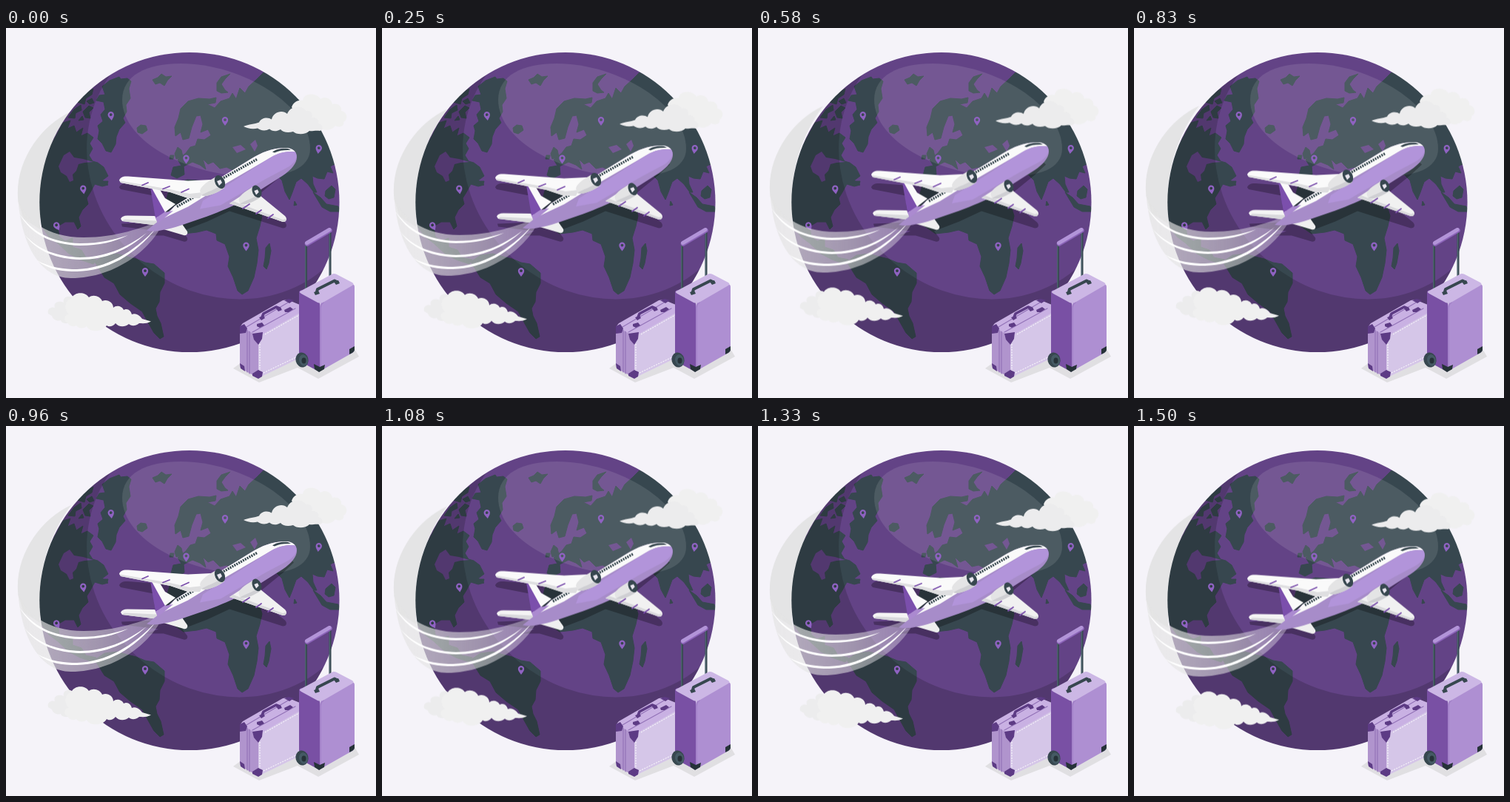
Animation, 500 px wide and 500 px high, one loop 1540 ms. Source, as an HTML page:

```html
<!DOCTYPE html>
<html lang="en">
<head>
<meta charset="utf-8">
<title>Travel</title>
<style>
html, body { margin: 0; width: 100%; height: 100%; overflow: hidden; background: #f5f3f9; }
svg { display: block; width: 100vw; height: 100vh; }
.float { animation: float 770ms -58ms linear infinite alternate; }
@keyframes float {
  from { transform: translateY(.75px); }
  to { transform: translateY(-9.25px); }
}
.land { fill: #37474f; stroke: #37474f; stroke-width: 1; stroke-linejoin: round; }
.sea { fill: #634386; }
.pin { fill: #8f62c2; fill-rule: evenodd; }
.line { fill: none; stroke-linecap: round; stroke-linejoin: round; }
</style>
</head>
<body>
<svg viewBox="0 0 500 500">
<defs>
  <clipPath id="globe"><circle cx="247.900" cy="235.500" r="202.600"/></clipPath>
  <linearGradient id="fade" gradientUnits="userSpaceOnUse" x1="20" y1="0" x2="215" y2="0">
    <stop offset="0" stop-color="#e4e4e4" stop-opacity=".7"/>
    <stop offset=".55" stop-color="#e4e4e4" stop-opacity=".54"/>
    <stop offset="1" stop-color="#e0d8ea" stop-opacity=".38"/>
  </linearGradient>
  <path id="pin" d="M0 6C-2 3-4.2 1-4.2-1.8A4.2 4.2 0 0 1 4.2-1.8C4.2 1 2 3 0 6ZM0-3.8A1.9 1.9 0 1 0 0 0A1.9 1.9 0 1 0 0-3.8Z"/>
  <path id="body" d="M190 272L204 261 228 239 270 213 330 176C346 166 360 161 375 160.500C387 160 393 165 393 173C393 181 386 190 374 198L322 231C306 240 290 246 272 253L240 264C222 270 202 275 190 272Z"/>
  <path id="wingL" d="M153 206C154 202 158 200 165 200.500L246 206.500 277 205 285 214 262 230 246 230 222 222 155 209Z"/>
  <path id="wingR" d="M302 237L319 226 344 227 377 254C380 257 380 262 374 262Z"/>
  <path id="tailL" d="M155 258C156 255 159 253.500 164 253.500L200 254 216 258 206 267 157 261Z"/>
  <path id="tailR" d="M213 272L238 265 245 275C246 278 244 281 240 280Z"/>
</defs>

<!-- trail behind the globe -->
<g class="float">
  <path fill="#e4e4e5" d="M88 113C46 132 10.500 182 16.500 235L24 258 46 272V240C45 190 64 145 88 113Z"/>
</g>

<!-- globe -->
<g clip-path="url(#globe)">
  <rect class="sea" x="40" y="30" width="415" height="412"/>
  <g class="land">
    <path d="M40 240L46 208 50 190 58 163 68 145 77 128 87 125 83 136 92 132 95 141 104 135 101 146 110 142 118 148 113 156 117 163 112 172 117 180 124 182 132 188 138 200 130 206 138 212 130 214 120 211 114 222 109 230 111 238 103 246 98 256 101 268 97 272 92 262 80 262 70 268 72 282 80 288 90 284 90 296 102 300 108 310 122 313 118 319 100 313 85 305 70 291 58 282 48 268Z"/>
    <path d="M120 316L133 307 150 305 164 309 176 312 188 317 200 319 214 331 214 345 208 357 207 370 202 379 204 389 209 399 213 417 208 420 200 412 191 396 184 383 168 372 154 360 146 345 133 337Z"/>
    <path d="M130 79L140 71 153 66 155 69 164 68 169 72 166 82 168 95 162 104 163 113 158 122 161 128 153 137 149 147 148 157 142 168 135 166 130 156 124 150 126 139 124 132 131 126 128 117 134 110 132 100 122 98 126 91 134 90Z"/>
    <path d="M96 100L106 89 118 82 116 90 108 95 106 103ZM84 121L92 110 101 104 102 111 94 115 93 122ZM104 113L112 105 118 108 112 114 114 122 107 121ZM98 125L103 119 105 124ZM109 99L116 95 119 101 113 103ZM131 207L138 207 137 211Z"/>
    <path d="M177 135L182 131 189 132 191 138 184 143 178 141ZM198 70L205 67 210 62 216 66 224 65 218 71 214 78 208 74 202 76Z"/>
    <path d="M285 85L285 74 291 66 303 62 296 69 291 76 296 84 300 87 291 88Z"/>
    <path d="M229 146L228 134 233 122 236 109 246 99 260 95 275 96 284 94 283 101 272 103 282 108 290 99 302 95 306 88 311 96 316 81 323 88 328 79 338 70 348 60 420 95 460 190 444 184 438 187 442 196 434 194 430 204 421 203 414 200 415 211 420 222 416 222 408 211 399 203 392 208 387 222 383 232 377 221 373 206 365 198 350 202 336 216 320 214 306 192 298 188 289 190 280 181 273 184 266 177 270 191 262 185 252 181 240 187 241 198 231 203 223 199 226 188 237 186 232 178 243 169 249 161 256 159 259 150 268 151 277 145 273 137 263 141 266 130 263 118 257 119 251 134 247 149 239 151 236 141Z"/>
    <path d="M228 170L232 161 237 165 239 174 230 177ZM222 172L227 172 226 177 221 177Z"/>
    <path d="M222 213L245 205 270 207 276 216 298 215 332 222 342 240 346 254 343 268 338 284 341 300 339 318 335 337 327 355 319 360 313 355 307 337 300 322 302 309 296 292 285 287 284 278 271 273 258 276 240 278 224 267 212 248Z"/>
    <path d="M351 297L356 291 358 301 355 318 352 326 348 322 350 311Z"/>
    <path d="M415 222L425 229 433 238 449 241 452 248 438 248 427 242ZM432 220L440 213 445 218 443 229 436 231 431 227ZM390 234L393 239 389 240Z"/>
  </g>
  <g class="sea">
    <path d="M78 172L86 167 92 175 104 177 118 181 106 182 98 184 95 193 90 198 91 206 86 208 82 200 74 195 71 187Z"/>
    <path d="M330 157L337 151 340 159 336 167ZM306 161L317 158 324 164 312 169ZM389 116L394 114 391 121Z"/>
  </g>
  <path fill-rule="evenodd" fill-opacity=".17" d="M40 30H460V445H40ZM145.900 57A196 178 40 0 0 446.100 309A196 178 40 0 0 145.900 57Z"/>
  <path fill="#fff" fill-opacity=".105" d="M157 97C157 64 190 48 236 48C320 48 411 105 411 163C411 190 380 201 335 201C250 201 157 155 157 97Z"/>
  <g class="pin">
    <use href="#pin" transform="translate(142 119) rotate(-8)"/>
    <use href="#pin" x="296" y="126"/>
    <use href="#pin" x="243.500" y="177.500"/>
    <use href="#pin" transform="translate(422.500 164) rotate(8)"/>
    <use href="#pin" transform="translate(104.500 218.500) rotate(-8)"/>
    <use href="#pin" transform="translate(69 268) rotate(-28)"/>
    <use href="#pin" x="324.500" y="295.500"/>
    <use href="#pin" x="188" y="330"/>
  </g>
  <path transform="translate(0 8.500)" opacity=".28" d="M153 207C154 203 158 201 165 201.500L246 207.500 277 205 330 176 375 163 389 176 374 190 330 226 344 227 377 254C380 257 380 262 374 262L302 239 272 253 238 266 245 275C246 278 244 281 240 280L213 272 190 272 206 266 157 260 156 256 203 254 199 218 155 209.500Z"/>
</g>

<!-- trail in front -->
<g class="float">
  <path fill="url(#fade)" d="M16.500 232C25 258 55 283 105 283C150 283 182 270 214 259C200 296 150 338 88 338C45 338 20.500 290 16.500 232Z"/>
  <g fill="#fff">
    <path d="M18 251C36 276 62 290 100 291C128 291 146 286 165 280C146 289 126 294 100 294C62 293 34 279 18 251Z"/>
    <path d="M25 279C44 301 72 309 100 310C132 310 162 298 190 277C164 301 134 313 100 313C70 312 42 303 25 279Z"/>
    <path d="M42 314C60 324 78 326 96 326C134 325 172 304 203 270C174 308 136 328 96 329C76 329 58 327 42 314Z"/>
  </g>
</g>

<!-- plane -->
<g class="float">
  <use href="#tailL" fill="#f4f4f4"/>
  <path fill="#d9d9dc" d="M157 261L206 267 213 261 160 258.500Z"/>
  <use href="#tailR" fill="#efefef"/>
  <g transform="translate(0 1.500)">
    <use href="#body" fill="#a78cc9"/>
    <path fill="#fafafa" d="M214 255L228 239 270 213 330 176C346 166 360 161 375 160.500C383 160 388 162 391 166C379 164 366 168 355 175L288 214 246 240Z"/>
    <path fill="#b294da" d="M355 175C366 168 378 164 391 166C395 173 391 180 382 186L350 203 290 238 262 243 266 232Z"/>
    <path fill="#37474f" d="M360 166C365 162 374 160.500 381 161.500L385 163.500C376 163 369 164 363 167Z"/>
    <path class="line" stroke="#37474f" stroke-width="3.400" stroke-dasharray="2 1.300" style="stroke-linecap:butt" d="M231 240L254 227M294 201L339 176"/>
  </g>
  <path fill="#7b4fac" d="M195 215.500L204 223 216 249 202 257Z"/>
  <path fill="#fafafa" d="M196 214.500L208 218.500 215 230 229 238 215 249Z"/>
  <path fill="#ab8ad0" d="M202 257L214 249 226 247 205 264Z"/>
  <use href="#wingL" fill="#fafafa"/>
  <path fill="#dfdfe1" d="M154 206.500L222 218 248 224 266 222 262 230 246 230 222 222 155 209Z"/>
  <use href="#wingR" fill="#f1f1f1"/>
  <path fill="#d9d9dc" d="M302 237L307 234 374 259 378 258C379 261 377 262.500 374 262Z"/>
  <path class="line" stroke="#7b4fac" stroke-width="1.800" d="M184 212.500L192 209M212 217.500L221 214M237 222L247 217.500M320 244L329 238M338 251L345 246M354 257L361 252"/>
  <g id="engine">
    <path fill="#e4e4e5" d="M262 220C263 213 276 205 286 200L295 216C284 224 270 229 264 226Z"/>
    <path fill="#cfcfd3" d="M264 226C270 222 284 218 293 211L295 216C284 224 270 229 264 226Z"/>
    <ellipse cx="289" cy="208" rx="6.500" ry="9.500" transform="rotate(-27 289 208)" fill="#37474f"/>
    <path fill="#e8e5ee" d="M285 207L290 205 292 209 288 213Z"/>
  </g>
  <use href="#engine" transform="translate(76 28.500) scale(.91 .925)"/>
</g>

<!-- clouds -->
<g class="float">
  <path fill="#f0f0f0" d="M386 107C389 98 397 97 401 98C402 87 420 87 425 96C432 91 440 96 441 103C449 101 454 106 453 112C461 113 463 123 456 127C458 133 449 135 445 132C440 139 432 138 428 137L405 134Z"/>
  <path fill="#ececed" d="M321 133C328 130 336 130 342 127.500C345 121 354 120 359 123.500C361 113 374 110 380 116C385 103 402 105 405 112C412 110 416 118 413 121C419 120 424 125 422 129C428 130 430 138 424 139C418 138 413 140 410 139C404 145 392 144 388 140C381 142 374 141 371 137C364 141 359 139 356 136.500C350 140 343 138 340 135.500C334 137 326 136 321 133Z"/>
  <path fill="#ececed" d="M57 386C55 379 62 376 66 378C63 370 73 368 78 371C76 364 84 361 89 364L120 390 88 397C82 401 75 399 74 395C68 397 63 393 62 389Z"/>
  <path fill="#f0f0f0" d="M83 398C76 395 80 387 85 387C77 379 81 367 88 366C92 356 107 356 112 364C118 359 128 363 130 369C137 366 145 371 145 378C149 374 157 376 159 381C164 378 169 382 170 387C176 384 182 390 184 393L196 396.500C190 400 184 399 180 399C174 404 168 402 166 400C160 405 152 404 148 399C144 404 139 404 136 402C131 411 113 412 109 403C104 407 97 406 95 402C90 405 85 402 83 398Z"/>
</g>

<!-- luggage -->
<path fill="#e0dfe2" d="M307 460L322 449 396 440 470 432 477 444 422 474 394 459 342 479Z"/>
<g stroke-linejoin="round">
  <path fill="#c9b1e3" d="M316 404L320 399 374 368 380 367 397 374V388L341 418Z"/>
  <path fill="#b094cd" d="M316 403L341 417V473L319 461Q316 459 316 456Z"/>
  <path fill="#d5c6e8" d="M341 417L397 385V446L341 473Z"/>
  <path class="line" stroke="#9373b8" stroke-width="1.200" d="M326 408V465M329 410V467M325 404L381 371M333 411L391 379"/>
  <path class="line" stroke="#fff" stroke-width="1" stroke-dasharray="2 1.500" style="stroke-linecap:butt" d="M343 427V464M350 414L396 388M348 466L396 443"/>
  <path fill="#5d3b85" d="M316 403L322 400 326 406 324 412 316 413ZM333 413L347 411 346 420 341 428 335 421ZM316 453L322 457 323 464 317 460ZM333 467L341 462 347 465 346 471 341 474 333 470ZM339 400L346 398 349 402 343 405 339 403ZM376 381L384 377 388 380 382 384 377 384ZM376 368L382 366 389 368 383 372Z"/>
  <path class="line" stroke="#5d3b85" stroke-width="3.600" d="M346 391L348 386 365 377 370 379"/>
  <path fill="#5d3b85" d="M342 391L348 389 350 392 345 395ZM365 379L371 378 373 381 368 383Z"/>
</g>
<path class="line" stroke="#37474f" stroke-width="3" d="M405.500 294V353M438 276V337"/>
<path class="line" stroke="#546e7a" stroke-width="1" d="M404.800 294V353M437.300 276V337"/>
<path class="line" stroke="#8b63b8" stroke-width="6.500" d="M407 291.500L437.500 273.500"/>
<path class="line" stroke="#b294d8" stroke-width="5" d="M406.500 290.500L437 272.500"/>
<path fill="#7950a4" d="M396 358Q396 354 400 354L424 370V465L400 452Q396 450 396 446Z"/>
<path fill="#ae8fd2" d="M424 376Q424 371 428 369L466 347Q471 345 471 350V433Q471 437 468 439L424 464Z"/>
<path fill="#ccb7e5" d="M397 356L440 333Q443 331 447 333L468 344Q471 346 468 348L430 370Q425 373 421 371L399 359Q396 357 397 356Z"/>
<path class="line" stroke="#9b78c2" stroke-width="1" d="M425 462V378Q425 374 429 371"/>
<path class="line" stroke="#37474f" stroke-width="4" d="M419.500 358L421 353 444 341.500 448 343.500"/>
<path fill="#37474f" d="M416 357L422 355 424 359 418 361ZM443 343L449 341 451 345 446 347Z"/>
<path fill="#263238" d="M416 454L424 458 431 455 430 461 423 465 417 461ZM464 434L471 430V435Q471 437 468 439L464 441Z"/>
<ellipse cx="400" cy="448.500" rx="8.500" ry="10" transform="rotate(-15 400 448.500)" fill="#37474f"/>
<ellipse cx="402" cy="449" rx="5.800" ry="7.800" transform="rotate(-15 402 449)" fill="#455a64"/>
<ellipse cx="402.500" cy="449.500" rx="3" ry="4" fill="#263238"/>
</svg>
</body>
</html>
```
